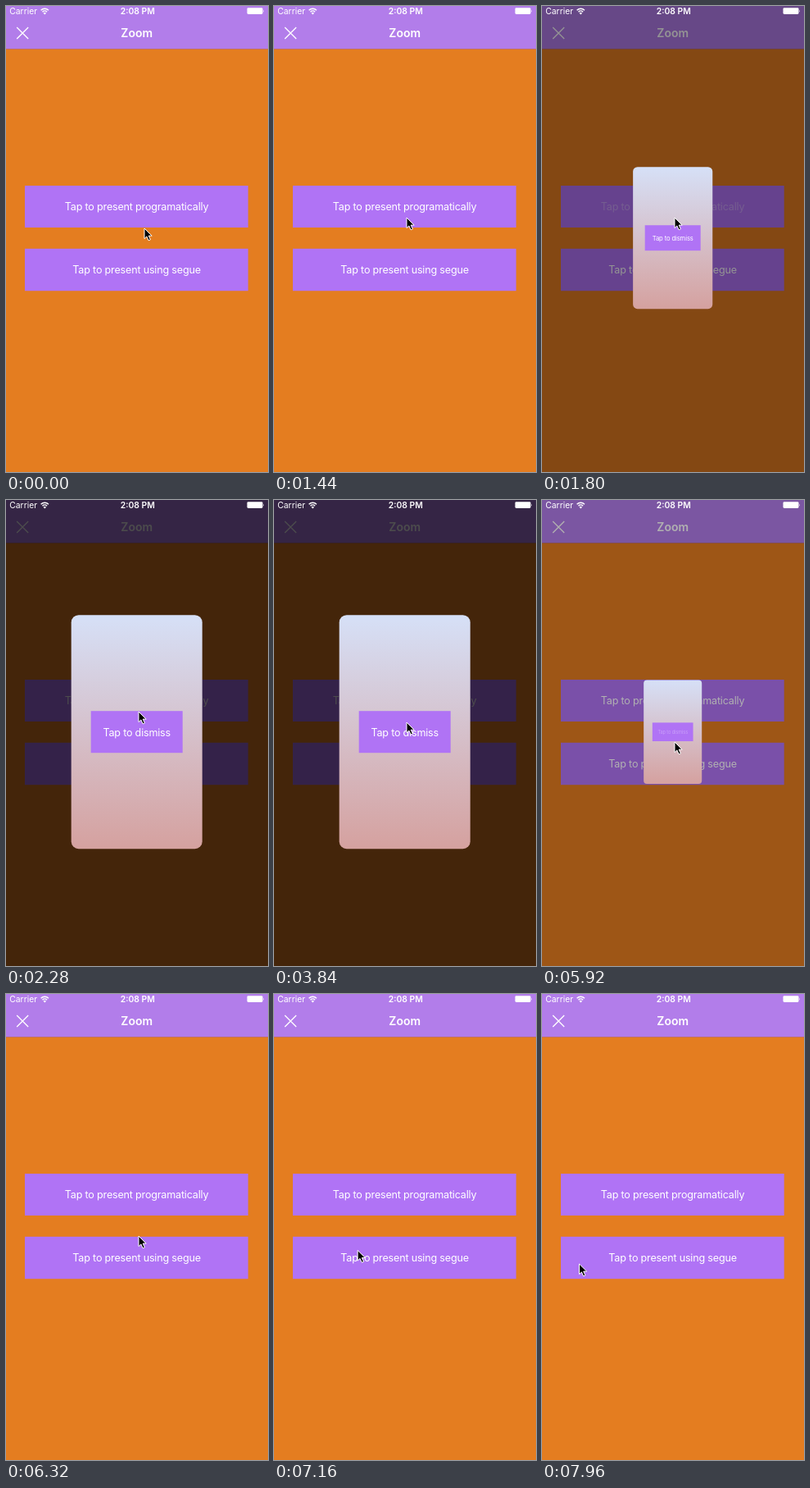
An HTML page for the animation above (8000 ms loop, 320 by 568 pixels).

```html
<!DOCTYPE html>
<html lang="en">
<head>
<meta charset="utf-8">
<title>Zoom</title>
<style>
  html, body { margin: 0; width: 100%; height: 100%; overflow: hidden; background: #e47d20; }
  svg { display: block; width: 100%; height: 100%; }
  text { font: 12.6px Inter, "Open Sans", sans-serif; letter-spacing: -.2px; fill: #fff; text-anchor: middle; }
  .title { font-size: 14px; font-weight: 600; letter-spacing: 0; }
  .status text { font-size: 10.4px; letter-spacing: 0; }
  .status .clock { font-weight: 600; }
  .button { fill: #b073f5; }
</style>
</head>
<body>
<svg viewBox="0 0 320 568">
  <defs>
    <linearGradient id="sky" x2="0" y2="1">
      <stop stop-color="#d6e0f7"/>
      <stop offset="1" stop-color="#d5a19f"/>
    </linearGradient>
  </defs>

  <rect width="320" height="568" fill="#e47d20"/>
  <rect width="320" height="52" fill="#b27dea"/>
  <rect y="52" width="320" height=".5" fill="#9a62b4"/>
  <path d="M13.2 26 27.2 40M27.2 26 13.2 40" stroke="#fff" stroke-width="1.3"/>
  <text class="title" x="159.7" y="38.4">Zoom</text>

  <rect class="button" x="23" y="219" width="272.7" height="51"/>
  <text id="present" x="159.6" y="249">Tap to present programatically</text>
  <rect class="button" x="23" y="295.8" width="272.7" height="51.4"/>
  <text x="159.6" y="326">Tap to present using segue</text>

  <rect id="dim" width="320" height="568" opacity="0"/>

  <g id="card">
    <rect x="-80" y="-142.5" width="160" height="285" rx="9" fill="url(#sky)"/>
    <rect class="button" x="-56" y="-25.5" width="112" height="51"/>
    <text id="dismiss" y="4.8">Tap to dismiss</text>
  </g>

  <g class="status">
    <text x="21.2" y="10">Carrier</text>
    <g fill="none" stroke="#fff" stroke-width="1.4">
      <path d="M42.6 5.2a6.6 6.6 0 0 1 9.4 0M44.5 7.2a4 4 0 0 1 5.6 0"/>
    </g>
    <path d="M47.3 10.4 45.6 8.7a2.4 2.4 0 0 1 3.4 0z" fill="#fff"/>
    <text class="clock" x="160.8" y="10">2:08 PM</text>
    <rect x="294.5" y="2.2" width="19" height="7.8" rx="1.4" fill="#fff"/>
    <path d="M314.2 4.7q1.5 1.4 0 2.8z" fill="#fff"/>
  </g>

  <path id="cursor" d="M0 0V12.6L2.9 9.9 5.1 14.8 7.4 13.8 5.2 9.1H9.2Z"
        fill="#000" stroke="#fff" stroke-width="1" stroke-linejoin="round"/>
</svg>

<script>
  const LOOP = 8000;
  const SPRING = 500;      // duration of the zoom
  const FADE = 450;        // duration of the label returning after a tap
  const tapPresent = { down: 1580, up: 1690 };
  const tapDismiss = { down: 5700, up: 5820 };

  // time, x, y of the pointer tip
  const pointer = [
    [0, 169, 271], [300, 169, 271], [1200, 162, 258], [3300, 162, 258],
    [3800, 162, 271], [4700, 162, 281], [5400, 162, 295],
    [6550, 162, 295], [7750, 45.5, 329], [LOOP, 45.5, 329]
  ];

  const $ = id => document.getElementById(id);
  const [present, dismiss, dim, card, cursor] =
    ['present', 'dismiss', 'dim', 'card', 'cursor'].map($);

  const clamp = v => Math.min(1, Math.max(0, v));
  const ease = v => v * v * (3 - 2 * v);

  // critically damped spring, settled at the end of its duration
  function spring(ms) {
    const u = clamp(ms / SPRING);
    if (u === 1) return 1;
    const w = 9.23 * u;
    return 1 - (1 + w) * Math.exp(-w);
  }

  function labelOpacity(t, { down, up }) {
    if (t < down) return 1;
    return .2 + .8 * ease(clamp((t - up) / FADE));
  }

  function pointerAt(t) {
    const i = pointer.findIndex(p => p[0] > t);
    const [t0, x0, y0] = pointer[i - 1], [t1, x1, y1] = pointer[i];
    const k = ease((t - t0) / (t1 - t0));
    return [x0 + (x1 - x0) * k, y0 + (y1 - y0) * k];
  }

  function draw(t) {
    const shown = spring(t - tapPresent.up) - spring(t - tapDismiss.up);
    dim.setAttribute('opacity', .7 * shown);
    card.setAttribute('transform', `translate(159.7 282.7) scale(${shown})`);
    card.setAttribute('visibility', shown > .005 ? 'visible' : 'hidden');
    present.setAttribute('opacity', labelOpacity(t, tapPresent));
    dismiss.setAttribute('opacity', labelOpacity(t, tapDismiss));
    cursor.setAttribute('transform', `translate(${pointerAt(t)})`);
  }

  const start = performance.now();
  function frame() {
    draw((performance.now() - start) % LOOP);
    requestAnimationFrame(frame);
  }
  frame();
</script>
</body>
</html>
```
